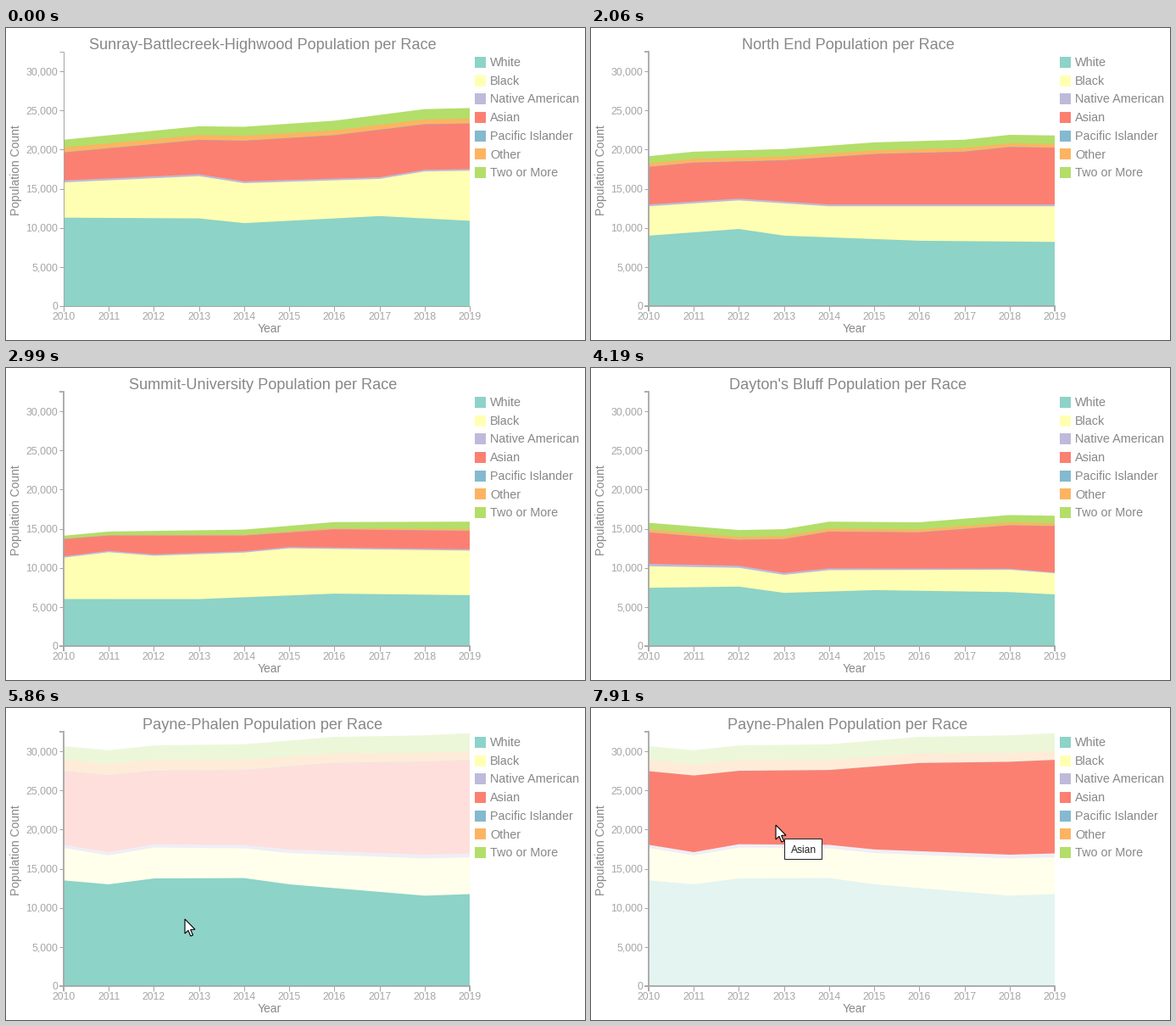
A matplotlib script for the animation above (8 s loop, 683 by 368 pixels).

```python
import numpy as np
import matplotlib.pyplot as plt
from matplotlib.animation import FuncAnimation
from matplotlib.colors import to_rgb
from matplotlib.patches import Polygon, Rectangle

W, H, DPI = 683, 368, 100
LOOP, STEP = 8000, 40
LEFT, RIGHT, TOP, BASE = 68, 547, 28, 328
UNIT = 277 / 300  # pixels per hundred people
YEARS = np.arange(10)
XS = np.linspace(LEFT, RIGHT, len(YEARS))
RACES = ["White", "Black", "Native American", "Asian",
         "Pacific Islander", "Other", "Two or More"]
COLORS = [np.array(to_rgb(c)) for c in
          ("#8dd3c7", "#ffffb3", "#bebada", "#fb8072", "#84b9d0", "#fdb462", "#b3de69")]
GRAY, LIGHT = "#888888", "#a6a6a6"
FADED = 0.25

plt.rcParams["font.family"] = "Liberation Sans"


def curve(keys):
    """Straight lines through a few {year: value} turning points."""
    return np.interp(YEARS, list(keys), list(keys.values()))


def district(name, white, black, asian, native, other, more):
    """Wide bands give their tops in hundreds, thin ones a first and last thickness."""
    native, other, more = (np.linspace(*ends, len(YEARS)) for ends in (native, other, more))
    black, asian = curve(black), curve(asian)
    return name, np.array([curve(white), black, black + native, asian, asian + 0.4,
                           asian + other, asian + other + more])


sunray = district(
    "Sunray-Battlecreek-Highwood",
    white={0: 113, 3: 112, 4: 106, 7: 115, 9: 109},
    black={0: 158, 3: 166, 4: 157, 7: 162.5, 8: 172, 9: 173},
    asian={0: 196, 3: 212, 4: 211, 6: 218, 8: 232, 9: 233},
    native=(2.5, 2), other=(6.5, 6.5), more=(10, 13.5))

north = district(
    "North End",
    white={0: 90, 2: 98.5, 3: 90, 6: 83.5, 9: 82},
    black={0: 127.5, 2: 135, 4: 127.5, 9: 127.5},
    asian={0: 177.5, 1: 183, 3: 186, 5: 194, 7: 197, 8: 203, 9: 202},
    native=(2.3, 2.3), other=(5, 5), more=(9, 11))

west = district(
    "West Side",
    white={0: 81, 5: 73, 9: 77},
    black={0: 103, 5: 97, 9: 104},
    asian={0: 118, 5: 114, 9: 121},
    native=(2, 2), other=(14, 12), more=(9, 12))

summit = district(
    "Summit-University",
    white={0: 60, 3: 60, 6: 67, 9: 65},
    black={0: 113, 1: 120, 2: 115.5, 4: 119.5, 5: 125, 9: 122},
    asian={0: 136.5, 1: 141, 4: 141, 6: 149, 9: 147},
    native=(1.7, 1.7), other=(1, 2.5), more=(3.5, 9.5))

dayton = district(
    "Dayton's Bluff",
    white={0: 74.5, 2: 76, 3: 68, 5: 71.5, 8: 69, 9: 66},
    black={0: 102, 2: 100, 3: 91, 4: 97, 8: 97.5, 9: 93},
    asian={0: 145, 2: 135.5, 3: 136.5, 4: 146, 6: 145, 8: 154, 9: 153},
    native=(3, 1.2), other=(4, 4), more=(8.5, 9.5))

payne = district(
    "Payne-Phalen",
    white={0: 135, 1: 130, 2: 137.5, 4: 138, 5: 130, 8: 115.5, 9: 117.5},
    black={0: 176.5, 1: 167, 2: 177, 4: 176, 5: 170, 8: 163, 9: 164.5},
    asian={0: 274.5, 1: 269, 2: 275, 4: 276, 6: 285, 8: 286.5, 9: 289},
    native=(4, 5), other=(15, 11), more=(17, 23))

# start, duration, district
SHOWS = [(-500, 1, sunray), (1145, 165, north), (2085, 215, west),
         (2845, 150, summit), (3830, 250, dayton), (4800, 225, payne)]
# start of hover, race index
HOVERS = [(5400, 0), (6150, 1), (7130, 3)]
FADE = 180
# start, end, label, left, top
TIPS = [(6820, 7100, "Black", 228, 207), (7820, LOOP, "Asian", 228, 154)]
# time, x, y
PATH = np.array([(5380, 47, 246), (5630, 184, 250), (5840, 184, 250), (5858, 211, 249),
                 (6150, 222, 199), (6450, 218, 191), (7100, 218, 191), (7320, 218, 138)])
ARROW = np.array([(0, 0), (0, 17), (4, 13.3), (6.8, 20), (9.5, 18.9),
                  (6.7, 12.4), (12, 12.2)])


def ease(p):
    p = min(max(p, 0), 1)
    return 4 * p ** 3 if p < 0.5 else 1 - 4 * (1 - p) ** 3


def tops_at(t):
    k = max(i for i, show in enumerate(SHOWS) if t >= show[0])
    start, span, (name, tops) = SHOWS[k]
    before = SHOWS[max(k - 1, 0)][2][1]
    return name, before + (tops - before) * ease((t - start) / span)


def strengths_at(t):
    level = np.ones(len(RACES))
    for start, race in HOVERS:
        goal = np.full(len(RACES), FADED)
        goal[race] = 1
        level += (goal - level) * ease((t - start) / FADE)
    return level


fig = plt.figure(figsize=(W / DPI, H / DPI), dpi=DPI, facecolor="white")
ax = fig.add_axes([0, 0, 1, 1])
ax.set_xlim(0, W)
ax.set_ylim(H, 0)
ax.axis("off")


def label(x, y, text, px, color=GRAY, ha="left", **kw):
    return ax.text(x, y, text, fontsize=px * 72 / DPI, color=color, ha=ha,
                   va="baseline", **kw)


def line(xs, ys, color=LIGHT, width=1):
    return ax.plot(xs, ys, color=color, lw=width * 72 / DPI, zorder=3,
                   solid_capstyle="butt", solid_joinstyle="miter")[0]


# Taller bands go behind, so neighbours meet without gaps.
bands = []
for i, color in enumerate(COLORS):
    bands.append(Polygon([(0, 0)] * 3, closed=True, lw=0, zorder=2 - i * 0.1))
    ax.add_patch(bands[-1])
    y = 40.3 + 21.7 * i
    ax.add_patch(Rectangle((553, y - 6.5), 13, 13, fc=color, lw=0))
    label(571, y + 4.8, RACES[i], 14.45)

axes_lines = [line([63, LEFT, LEFT, 63], [TOP, TOP, BASE, BASE]),
              line([LEFT, LEFT, RIGHT, RIGHT], [334, BASE, BASE, 334])]
for v in range(0, 30001, 5000):
    y = BASE - v / 100 * UNIT
    line([63, LEFT], [y, y])
    label(61, y + 4.2, f"{v:,}", 12.4, LIGHT, "right")
for i, x in enumerate(XS):
    line([x, x], [BASE, 334])
    label(x, 344, str(2010 + i), 12.2, LIGHT, "center")

label(310.5, 359, "Year", 13.9, ha="center")
label(16, 167.5, "Population Count", 13.85, ha="center", rotation=90, rotation_mode="anchor")
title = label(303, 25, "", 18.1, ha="center")

tip_box = Rectangle((0, 0), 44, 24, fc="white", ec="#222222", lw=0.72, zorder=5)
ax.add_patch(tip_box)
tip_text = label(0, 0, "", 12, "#222222", "center", zorder=6)
cursor = Polygon(ARROW, closed=True, fc="white", ec="black", lw=0.8, zorder=7)
ax.add_patch(cursor)


def draw(i):
    t = i * STEP + STEP / 2
    name, tops = tops_at(t)
    title.set_text(f"{name} Population per Race")
    for band, top, color, level in zip(bands, tops, COLORS, strengths_at(t)):
        edge = np.column_stack([XS, BASE - top * UNIT])
        band.set_xy(np.vstack([edge, (RIGHT, BASE), (LEFT, BASE)]))
        band.set_facecolor(1 - (1 - color) * level)
    for axis in axes_lines:
        axis.set_linewidth((1 if t < SHOWS[1][0] else 1.8) * 72 / DPI)

    tip = next((tip for tip in TIPS if tip[0] <= t < tip[1]), None)
    tip_box.set_visible(tip is not None)
    tip_text.set_visible(tip is not None)
    if tip:
        _, _, text, x, y = tip
        tip_box.set_xy((x - 0.4, y - 0.4))
        tip_text.set_text(text)
        tip_text.set_position((x + 23, y + 17))

    cursor.set_visible(t >= PATH[0, 0])
    spot = [np.interp(t, PATH[:, 0], PATH[:, c]) for c in (1, 2)]
    cursor.set_xy(ARROW + np.round(spot))
    return [*bands, *axes_lines, title, tip_box, tip_text, cursor]


anim = FuncAnimation(fig, draw, frames=LOOP // STEP, interval=STEP,
                     init_func=lambda: draw(0), repeat=True, repeat_delay=0, blit=False)
plt.show()
```
